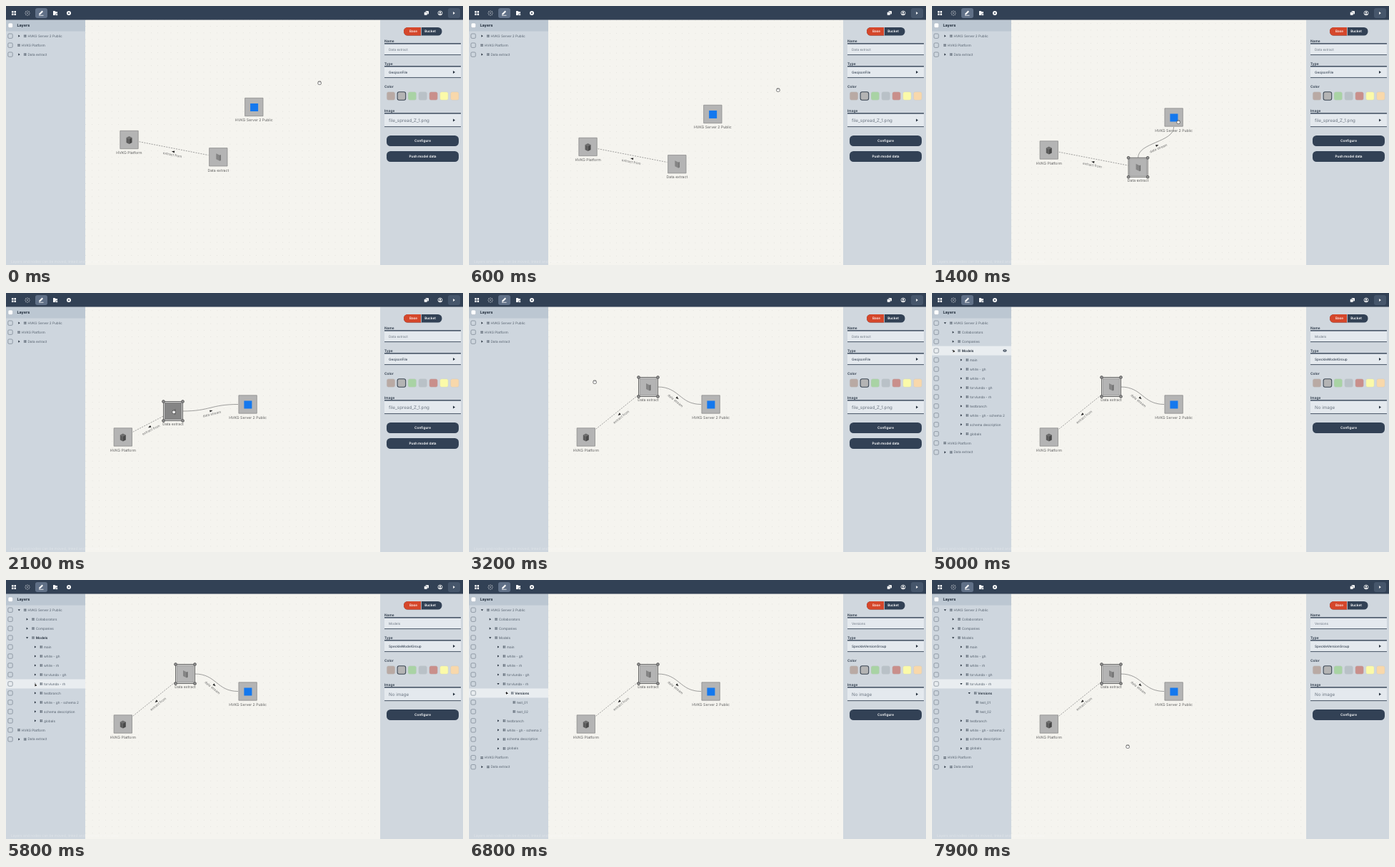
These frames come from a looping animation (640x364 px, 8000 ms). An HTML page with a canvas:

```html
<!DOCTYPE html>
<html lang="en">
<head>
<meta charset="utf-8">
<title>Node editor</title>
<style>
html, body { margin: 0; width: 100%; height: 100%; overflow: hidden; background: #f5f4ef; }
canvas { display: block; width: 640px; height: 364px; }
</style>
</head>
<body>
<canvas id="stage"></canvas>
<script>
const LOOP = 8000, NAVY = '#324155', INK = '#3b4858', GREY = '#6c7682';
const stage = document.getElementById('stage'), c = stage.getContext('2d');
const ratio = window.devicePixelRatio || 1;
stage.width = 640 * ratio;
stage.height = 364 * ratio;

// Times of the interactions
const SELECT = 1100, LINK = 1350, OPEN_SERVER = 3800, OPEN_MODELS = 5000,
  OPEN_BRANCH = 5900, OPEN_VERSIONS = 6700, LEAVE = 7250;

const cursorPath = [
  [100, 439, 108], [900, 430, 122.5], [1100, 289, 213], [1350, 345, 163], [1500, 345, 163],
  [1800, 289, 227], [1900, 289, 227], [2100, 235, 167], [2600, 252, 133], [2800, 252, 133],
  [3200, 176, 125], [3600, 20, 43], [3800, 18, 42], [4200, 38, 79], [4700, 30, 81],
  [5000, 30, 81], [5700, 41, 147], [5900, 41, 147], [6500, 52, 159], [6750, 52, 159],
  [7100, 60, 147], [LEAVE, 62, 147], [7600, 274, 234]
];
const panPath = [[100, 0, 0], [900, -8.7, 14.5]];
const dragPath = [[1900, 297.3, 212.3], [2100, 242.7, 151.5], [2600, 259.7, 117.5]];

function along(path, t) {
  if (t <= path[0][0]) return path[0].slice(1);
  for (let i = 1; i < path.length; i++) {
    const [t0, x0, y0] = path[i - 1], [t1, x1, y1] = path[i];
    if (t < t1) {
      const u = (t - t0) / (t1 - t0), k = u * u * (3 - 2 * u);
      return [x0 + (x1 - x0) * k, y0 + (y1 - y0) * k];
    }
  }
  return path[path.length - 1].slice(1);
}

function text(s, x, y, size, color = INK, weight = 400, align = 'left') {
  c.font = `${weight} ${size}px Inter, sans-serif`;
  c.fillStyle = color;
  c.textAlign = align;
  c.fillText(s, x, y + size * 0.36);
}
function rect(x, y, w, h, fill) {
  c.fillStyle = fill;
  c.fillRect(x, y, w, h);
}
function round(x, y, w, h, r, fill, stroke, line = 0.7) {
  c.beginPath();
  c.roundRect(x, y, w, h, r);
  if (fill) { c.fillStyle = fill; c.fill(); }
  if (stroke) { c.strokeStyle = stroke; c.lineWidth = line; c.stroke(); }
}
function disc(x, y, r, fill, stroke, line = 0.8) {
  round(x - r, y - r, 2 * r, 2 * r, r, fill, stroke, line);
}
function poly(fill, ...p) {
  c.beginPath();
  for (let i = 0; i < p.length; i += 2) c.lineTo(p[i], p[i + 1]);
  c.closePath();
  c.fillStyle = fill;
  c.fill();
}
function caret(x, y, open, s = 1.6, color = '#202b38') {
  if (open) poly(color, x - s, y - s * 0.6, x + s, y - s * 0.6, x, y + s * 0.8);
  else poly(color, x - s * 0.6, y - s, x - s * 0.6, y + s, x + s * 0.8, y);
}
function four(x, y, s, gap, color) {
  for (const [i, j] of [[0, 0], [1, 0], [0, 1], [1, 1]])
    rect(x - s - gap / 2 + i * (s + gap), y - s - gap / 2 + j * (s + gap), s, s, color);
}

function topBar() {
  rect(0, 0, 640, 19.5, NAVY);
  round(41, 3, 17, 14, 3, '#607087');
  round(619, 3, 17, 14, 3, '#46566b');
  four(11, 10, 2.5, 1, '#fff');
  for (let i = 0; i < 8; i++) {
    const a = i * Math.PI / 4;
    disc(30 + 3 * Math.cos(a), 10 + 3 * Math.sin(a), 0.6, '#fff');
  }
  disc(30, 10, 0.7, '#fff');
  poly('#fff', 46, 12.5, 46.5, 10.5, 50.5, 6.5, 52, 8, 48, 12);
  rect(46, 12.8, 6.5, 0.8, '#fff');
  poly('#fff', 66, 7, 68.5, 7, 69.5, 8, 72, 8, 72, 13, 66, 13);
  disc(71, 12, 1.5, '#fff', NAVY, 0.6);
  disc(88, 10, 3, '#fff');
  poly(NAVY, 88, 8.6, 89.2, 10, 88, 11.4, 86.8, 10);
  round(587.5, 7, 4.5, 4.5, 1, '#fff');
  round(585.5, 8.5, 4.5, 4.5, 1, '#fff', NAVY, 0.5);
  disc(608, 10, 3, null, '#fff');
  disc(608, 9.2, 1.1, '#fff');
  round(606.2, 10.8, 3.6, 1.4, 0.7, '#fff');
  caret(627.3, 10, false, 1.9, '#fff');
}

function grid(px, py) {
  const step = 9.2, start = v => ((v % step) + step) % step;
  c.fillStyle = '#dcdbd6';
  for (let x = 111 + start(px); x < 524; x += step)
    for (let y = 19 + start(py); y < 364; y += step) c.fillRect(x, y, 0.8, 0.8);
}

function edgeLabel(x, y, angle, name, arrowSide) {
  c.save();
  c.translate(x, y);
  c.rotate(angle);
  poly('#222', arrowSide * 2.2, 4.5, -arrowSide * 2, 3, -arrowSide * 2, 6);
  text(name, 0, 9, 4.7, '#6e6e6e', 400, 'center');
  c.restore();
}
function extractEdge([x0, y0], [x1, y1]) {
  const dx = x1 - x0, dy = y1 - y0, k = 14 / Math.max(Math.abs(dx), Math.abs(dy));
  c.beginPath();
  c.setLineDash([2, 1.5]);
  c.moveTo(x0 + dx * k, y0 + dy * k);
  c.lineTo(x1 - dx * k, y1 - dy * k);
  c.strokeStyle = '#777';
  c.lineWidth = 0.7;
  c.stroke();
  c.setLineDash([]);
  edgeLabel((x0 + x1) / 2, (y0 + y1) / 2, Math.atan2(dy, dx), 'extract from', -1);
}
function streamEdge([x0, y0], [x1, y1], done) {
  const flat = Math.abs(x1 - x0) > Math.abs(y1 - y0), pad = done ? 13.5 : 0;
  if (flat) { x0 += 13.5; x1 -= pad; } else { y0 -= 13.5; y1 += pad; }
  const mx = (x0 + x1) / 2, my = (y0 + y1) / 2;
  c.beginPath();
  c.moveTo(x0, y0);
  if (flat) c.bezierCurveTo(mx, y0, mx, y1, x1, y1);
  else c.bezierCurveTo(x0, my, x1, my, x1, y1);
  c.strokeStyle = '#777';
  c.lineWidth = 0.7;
  c.stroke();
  const dx = x1 - x0, dy = y1 - y0;
  if (done) edgeLabel(mx, my, flat ? Math.atan2(2 * dy, dx) : Math.atan2(dy, 2 * dx), 'data stream', 1);
}

function node([x, y], name, icon, selected, pressed) {
  if (selected) rect(x - 13.7, y - 13.7, 27.4, 27.4, '#f8f8f6');
  const h = selected ? 12 : 12.7;
  round(x - h, y - h, 2 * h, 2 * h, 0, pressed ? '#858585' : '#b4b4b4', '#858585');
  icon(x, y);
  if (selected) {
    round(x - 13.5, y - 13.5, 27, 27, 0, null, '#555', 0.9);
    for (const i of [-1, 1]) for (const j of [-1, 1])
      disc(x + i * 13.5, y + j * 13.5, 1.9, '#929292', '#4b4b4b', 0.8);
  }
  text(name, x, y + 18.4, 5.15, '#5c5c5c', 400, 'center');
}
const icons = {
  box(x, y) {
    poly('#6d6d6d', x - 4, y - 3, x, y - 5, x + 4, y - 3, x, y - 1);
    poly('#5c5c5c', x - 4, y - 3, x, y - 1, x, y + 6, x - 4, y + 4);
    poly('#494949', x + 4, y - 3, x, y - 1, x, y + 6, x + 4, y + 4);
  },
  slab(x, y) {
    poly('#858585', x - 3, y - 5, x + 2, y - 2.5, x + 2, y + 5.5, x - 3, y + 3);
    poly('#666', x + 2, y - 2.5, x + 3.5, y - 3.3, x + 3.5, y + 4.6, x + 2, y + 5.5);
  },
  square(x, y) { rect(x - 5.2, y - 5, 11, 11, '#1478ee'); }
};

function treeRows(t) {
  const rows = [];
  const add = (depth, name, branch = true, open = false, bold = false) =>
    rows.push({ depth, name, branch, open, bold });
  const server = t >= OPEN_SERVER, models = t >= OPEN_MODELS,
    branch = t >= OPEN_BRANCH, versions = t >= OPEN_VERSIONS;
  add(0, 'HVKG Server 2 Public', true, server, server && !models);
  if (server) {
    add(1, 'Collaborators');
    add(1, 'Companies');
    add(1, 'Models', true, models, models && !branch);
  }
  if (models) {
    for (const name of ['main', 'white - gh', 'white - rh', 'torvlunda - gh']) add(2, name);
    add(2, 'torvlunda - rh', true, branch, branch && !versions);
    if (branch) add(3, 'Versions', true, versions, versions);
    if (versions) {
      add(4, 'test_01', false);
      add(4, 'test_02', false);
    }
    for (const name of ['testbranch', 'white - gh - schema 2', 'schema description', 'globals']) add(2, name);
  }
  add(0, 'HVKG Platform', false);
  add(0, 'Data extract');
  return rows;
}

function sidebar(t) {
  rect(0, 19.5, 111, 344.5, '#ced6de');
  rect(0, 19.5, 111, 16, '#bcc7d2');
  round(3, 24, 6.5, 6.5, 1.8, '#fff', '#aab4c0', 0.5);
  text('Layers', 15.5, 27.2, 5.4, '#1f2b39', 700);
  const [hx, hy] = along(cursorPath, Math.min(t, LEAVE));
  treeRows(t).forEach((row, i) => {
    const y = 42.2 + 12.97 * i, hover = hx < 111 && Math.abs(hy - y) < 6.48;
    if (hover) rect(0, y - 6.5, 111, 13, '#e9edf0');
    round(2.8, y - 3.2, 6.4, 6.4, 1.5, null, '#66717f', 0.6);
    let x = 18 + 11.3 * row.depth;
    if (row.branch) {
      caret(x + 0.3, y, row.open);
      x += 8.7;
    }
    four(x, y, 1.3, 0.6, '#333f4d');
    text(row.name, x + 3.7, y, 4.7, row.bold ? '#202b38' : '#55606d', row.bold ? 600 : 400);
    if (hover && row.branch && row.depth < 2) {
      c.beginPath();
      c.ellipse(102, y, 2.7, 1.8, 0, 0, 7);
      c.fillStyle = INK;
      c.fill();
      disc(102, y, 0.9, INK, '#e9edf0', 0.5);
    }
  });
}

function details(t) {
  if (t < OPEN_SERVER) return ['Data extract', 'GeojsonFile', 'file_spread_Z_1.png'];
  if (t < OPEN_MODELS) return ['HVKG Server 2 Public', 'SpeckleProject', 'speckle.png'];
  if (t < OPEN_BRANCH) return ['Models', 'SpeckleModelGroup', 'No image'];
  if (t < OPEN_VERSIONS) return ['torvlunda - rh', 'SpeckleModel', 'No image'];
  return ['Versions', 'SpeckleVersionGroup', 'No image'];
}
function field(label, y, h, value, size, color, weight, pick) {
  text(label, 530, y - 4.2, 4.8, '#273444', 600);
  rect(530, y, 107, h, '#e4e9ee');
  rect(530, y - 0.8, 107, 1.4, NAVY);
  rect(530, y + h - 0.8, 107, 0.9, NAVY);
  text(value, 536, y + h / 2 + 0.2, size, color, weight);
  if (pick) caret(627.3, y + h / 2, false, 2.1);
}
function button(label, y) {
  round(533, y, 101, 15, 5.5, NAVY);
  text(label, 583.5, y + 7.5, 4.75, '#fff', 600, 'center');
}
function panel(t) {
  const [name, type, image] = details(t);
  rect(524, 19.5, 116, 344.5, '#d0d7de');
  round(557, 30, 53.5, 11.5, 5.5, NAVY);
  round(557, 30, 24, 11.5, [5.5, 0, 0, 5.5], '#d5472b');
  rect(581, 30, 0.7, 11.5, '#e4e9ee');
  text('Base', 570.5, 35.8, 4.7, '#fff', 500, 'center');
  text('Bucket', 594, 35.8, 4.7, '#fff', 600, 'center');
  field('Name', 53, 16, name, 4.65, GREY, 400, false);
  field('Type', 85, 16, type, 4.7, '#354252', 500, true);
  text('Color', 530, 113, 4.8, '#273444', 600);
  ['#b9aaa4', '#b4b4b4', '#a9d3a4', '#b9c1c7', '#c98f8b', '#fbfaa9', '#f8d8ab'].forEach((color, i) => {
    const x = 539 + 14.9 * i;
    round(x - 5.8, 120.7, 11.6, 11.6, 2.5, color, i === 1 ? '#3d4855' : '#c3c8cc', i === 1 ? 1.1 : 0.4);
  });
  field('Image', 151, 19, image, 6.25, GREY, 400, true);
  button('Configure', 182);
  if (t < OPEN_SERVER) button('Push model data', 204);
}

function pointer(t) {
  const [x, y] = along(cursorPath, t);
  if (x < 111) {
    poly('#fff', x - 1, y - 2.6, x - 1, y + 3.6, x + 0.6, y + 2.4, x + 3.6, y + 2);
    poly('#111', x - 0.5, y - 1.6, x - 0.5, y + 2.8, x + 0.7, y + 1.7, x + 2.5, y + 1.5);
  } else {
    round(x - 2.2, y - 2, 4.6, 4.5, 1.8, '#fff', '#444', 0.7);
    for (let i = -1; i < 2; i++) rect(x + i * 1.2 - 0.2, y - 2.4, 0.5, 1.8, '#555');
  }
}

function draw(t) {
  const [px, py] = along(panPath, t), at = (x, y) => [x + px, y + py];
  const server = at(347.3, 142), platform = at(172.5, 188), extract = at(...along(dragPath, t));
  c.setTransform(ratio, 0, 0, ratio, 0, 0);
  c.textRendering = 'geometricPrecision';
  rect(0, 0, 640, 364, '#f5f4ef');
  grid(px, py);
  extractEdge(platform, extract);
  if (t >= LINK) streamEdge(extract, server, true);
  else if (t > SELECT) streamEdge(extract, along(cursorPath, t), false);
  node(server, 'HVKG Server 2 Public', icons.square);
  node(platform, 'HVKG Platform', icons.box);
  node(extract, 'Data extract', icons.slab, t >= SELECT, t >= 1850 && t < 2650);
  sidebar(t);
  panel(t);
  topBar();
  text('Layers and nodes can be moved, linked and opened in this view', 7, 359.5, 5, 'rgba(255,255,255,.35)');
  pointer(t);
}

const start = performance.now();
function tick() {
  draw((performance.now() - start) % LOOP);
  requestAnimationFrame(tick);
}
tick();
</script>
</body>
</html>
```
